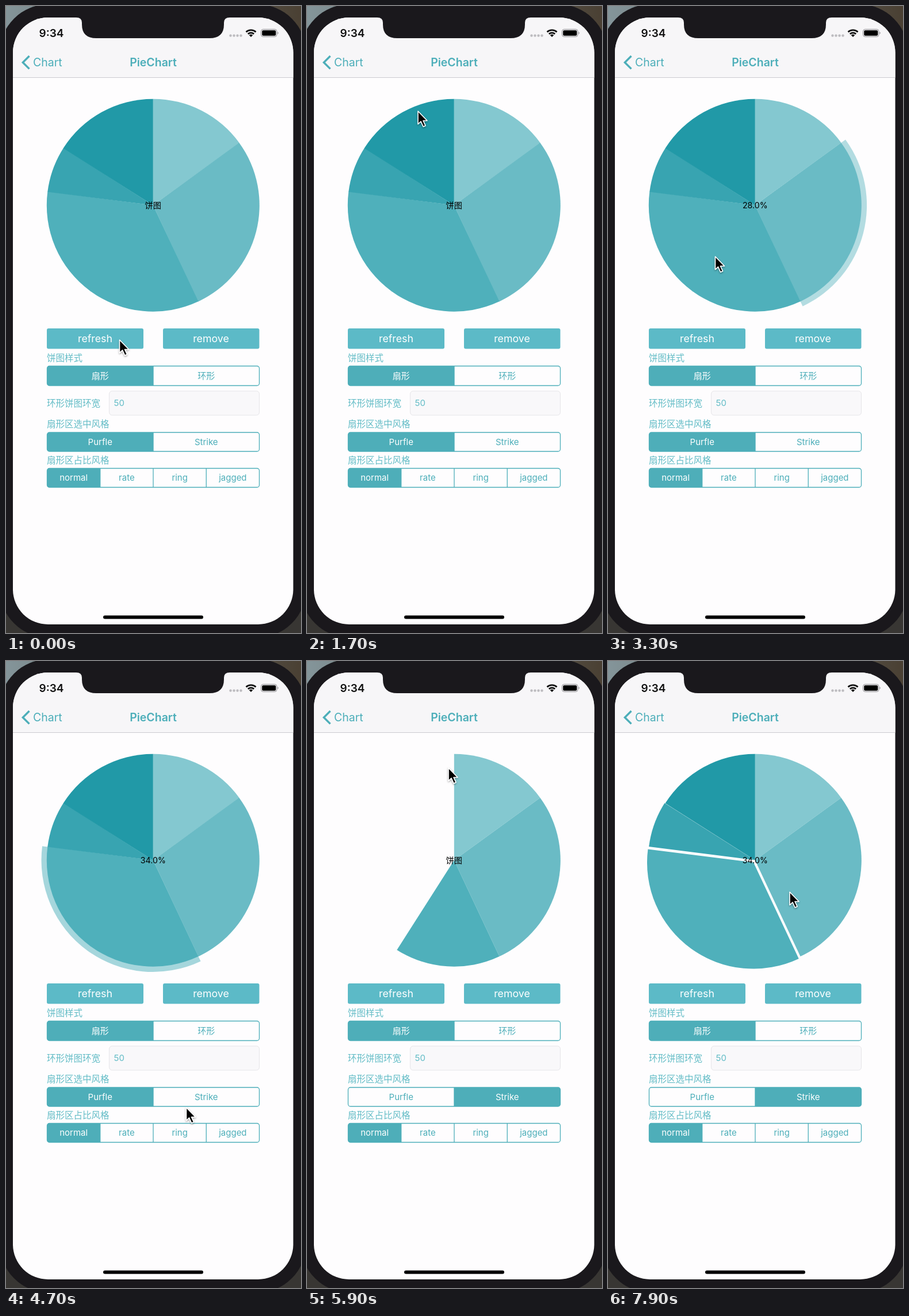
Write an HTML page that moves like this. It is 513 px wide and 1091 px high and loops after 8 s.

```html
<!DOCTYPE html>
<html lang="zh">
<head>
<meta charset="utf-8">
<title>PieChart</title>
<style>
  html, body { margin: 0; width: 100%; height: 100%; overflow: hidden; background: #1a181c; }
  svg { display: block; width: 100vw; height: 100vh; }
  text { font-family: Inter, "Noto Sans CJK SC", "Noto Sans CJK", sans-serif; fill: #4caeb9; }
  .mid { text-anchor: middle; }
  .label { font-size: 15.5px; fill: #62bcc6; }
  .btn { font-size: 17.8px; fill: #fff; }
  .seg { font-size: 15px; }
</style>
</head>
<body>
<svg viewBox="0 0 513 1091" preserveAspectRatio="none">
  <defs>
    <clipPath id="screen"><rect x="12" y="20" width="487.500" height="1056" rx="61"/></clipPath>
    <filter id="shade" x="-50%" y="-50%" width="200%" height="200%">
      <feDropShadow dx="0" dy="1.500" stdDeviation="1.400" flood-opacity=".4"/>
    </filter>
    <linearGradient id="desk" x2="1" y2="0">
      <stop offset="0" stop-color="#84959a"/><stop offset="1" stop-color="#4a4033"/>
    </linearGradient>
  </defs>

  <rect width="513" height="545" fill="url(#desk)"/>
  <rect y="545" width="513" height="546" fill="#383633"/>
  <rect x="-11" y="-3" width="533" height="1102" rx="85" fill="#1a181c"/>
  <g clip-path="url(#screen)">
    <rect y="20" width="513" height="1060" fill="#fefdfe"/>
    <rect y="20" width="513" height="104" fill="#f7f6f8"/>
    <rect y="124" width="513" height="1" fill="#cccbd0"/>
  </g>
  <path d="M122 19V20Q132 20 132 29V32Q132 56 157 56H354Q379 56 379 32V29Q379 20 389 20V19Z" fill="#1a181c"/>

  <text class="mid" x="79" y="54" font-size="19" font-weight="600" style="fill:#111">9:34</text>
  <g fill="#bdbcc0">
    <circle cx="390.500" cy="51.500" r="2.200"/><circle cx="396.500" cy="51.500" r="2.200"/>
    <circle cx="402.500" cy="51.500" r="2.200"/><circle cx="408.500" cy="51.500" r="2.200"/>
  </g>
  <g fill="none" stroke="#111" stroke-width="2.800">
    <path d="M417.500 45.200A12.500 12.500 0 0 1 434.500 45.200"/>
    <path d="M420.800 48.700A7.800 7.800 0 0 1 431.200 48.700"/>
  </g>
  <path d="M426 54L422.700 50.800A4.800 4.800 0 0 1 429.300 50.800Z" fill="#111"/>
  <rect x="443.500" y="40.500" width="27.500" height="13" rx="3.800" fill="none" stroke="#8d8c90"/>
  <rect x="445.200" y="42.200" width="24.100" height="9.600" rx="2.300" fill="#000"/>
  <path d="M472.500 44.800Q475 47 472.500 49.200Z" fill="#8d8c90"/>

  <path d="M40.500 87L29.300 98.200L40.500 109.400" fill="none" stroke="#4caeb9" stroke-width="3.400"/>
  <text x="47" y="105" font-size="19.500">Chart</text>
  <text class="mid" x="256" y="105" font-size="19.500" font-weight="600">PieChart</text>

  <g id="pie"></g>
  <text id="caption" class="mid" x="255.800" y="352" font-size="14.200" style="fill:#000"></text>

  <g fill="#5cbac7">
    <rect x="71" y="561" width="168" height="35.500" rx="3"/>
    <rect x="273" y="561" width="167.500" height="35.500" rx="3"/>
  </g>
  <text class="mid btn" x="155" y="585">refresh</text>
  <text class="mid btn" x="356.500" y="585">remove</text>

  <text class="label" x="71" y="617.500">饼图样式</text>
  <text class="label" x="71" y="696.500">环形饼图环宽</text>
  <rect x="179.500" y="670" width="261" height="42" rx="5" fill="#f9f8fa" stroke="#e6e5e9"/>
  <text class="label" x="187.500" y="696" style="font-size:15px">50</text>
  <text class="label" x="71" y="733">扇形区选中风格</text>
  <text class="label" x="71" y="795.500">扇形区占比风格</text>
  <g id="segments"></g>

  <rect x="169" y="1060.500" width="174" height="6" rx="3" fill="#000"/>
  <path id="cursor" d="M0 0V22.500L5 17.800L9.200 27L13 25.200L9 16.500H16Z"
        fill="#000" stroke="#fff" stroke-width="1.600" stroke-linejoin="round" filter="url(#shade)"/>
</svg>
<script>
const LOOP = 8000, STEP = 100;
const CX = 255.8, CY = 346.7, R = 185, RIM = 9.3;
const SWEEP = 830, SLIDE = 250, GAP = 6;
const rates = [0.15, 0.28, 0.34, 0.07, 0.16];
const colors = ['#84c8d0', '#6abbc5', '#4fb0bb', '#38a4b1', '#2199a7'];
const starts = rates.map((_, i) => rates.slice(0, i).reduce((a, b) => a + b, 0));

// Clicks: [time, action, slice]
const clicks = [
  [605, 'refresh'], [2000, 'pick', 4], [2400, 'pick', 0], [2900, 'pick', 1], [3500, 'pick', 2],
  [5410, 'strike'], [6500, 'pick', 4], [6900, 'pick', 3], [7700, 'pick', 2]
];
// Pointer stops: [time, x, y]
const stops = [
  [0, 197.5, 581], [500, 183, 580], [1000, 179, 579], [1250, 180, 540], [1700, 193, 183],
  [2000, 200, 195], [2400, 295, 220], [2900, 350, 350], [3300, 186.5, 436], [3800, 188, 442],
  [4500, 295, 755], [4700, 313.5, 777], [4900, 322, 800], [5200, 335, 768], [5450, 332, 760],
  [5900, 246, 186], [6500, 210, 215], [6900, 125, 288], [7250, 290, 488],
  [7700, 295, 455], [7900, 316, 402], [8000, 316, 402]
];

const $ = id => document.getElementById(id);
const clamp = v => Math.max(0, Math.min(1, v));
const point = (turn, r) => {
  const a = turn * 2 * Math.PI;
  return [CX + r * Math.sin(a), CY - r * Math.cos(a)];
};

function wedge(from, to, r) {
  const big = to - from > 0.5 ? 1 : 0;
  return `M${CX} ${CY}L${point(from, r)}A${r} ${r} 0 ${big} 1 ${point(to, r)}Z`;
}

function segment(y, h, names, on) {
  const x = 71.5, w = 369, cell = w / names.length;
  const clip = `inset(0 ${w - cell * (on + 1)}px 0 ${cell * on}px)`;
  const box = `x="${x}" y="${y}" width="${w}" height="${h}" rx="4"`;
  let out = `<rect ${box} fill="#4eaeb9" style="clip-path:${clip}"/>` +
    `<rect ${box} fill="none" stroke="#4caeb9" stroke-width="1.3"/>`;
  names.forEach((name, i) => {
    const left = x + cell * i;
    if (i) out += `<path d="M${left} ${y}v${h}" stroke="#4caeb9" stroke-width="1.3"/>`;
    out += `<text class="mid seg" x="${left + cell / 2}" y="${y + h / 2 + 5.4}"` +
      `${i === on ? ' style="fill:#fff"' : ''}>${name}</text>`;
  });
  return out;
}

function stateAt(t) {
  const s = { style: 0, sweep: 1, pick: -1, last: -1, slide: 1 };
  for (const [at, action, slice] of clicks) {
    if (t < at) break;
    if (action === 'pick') {
      s.last = s.pick;
      s.pick = slice;
      s.slide = clamp((t - at) / SLIDE);
    } else {
      s.pick = s.last = -1;
      s.sweep = clamp((t - at) / SWEEP);
      if (action === 'strike') s.style = 1;
    }
  }
  return s;
}

function drawPie(s) {
  let out = '';
  rates.forEach((rate, i) => {
    const from = starts[i], to = Math.min(from + rate, s.sweep);
    if (to <= from) return;
    if (s.style === 0 && i === s.pick)
      out += `<path d="${wedge(from, to, R + RIM)}" fill="#fefdfe"/>` +
        `<path d="${wedge(from, to, R + RIM)}" fill="${colors[i]}" opacity=".5"/>`;
    const out1 = s.style === 0 ? 0 : i === s.pick ? s.slide : i === s.last ? 1 - s.slide : 0;
    const [px, py] = point(from + rate / 2, GAP * out1);
    // A hair of overlap hides the seam under the next slice
    const end = i < 4 && to < s.sweep && s.style === 0 ? to + 0.0006 : to;
    out += `<path d="${wedge(from, Math.min(end, 0.99999), R)}" fill="${colors[i]}"` +
      ` transform="translate(${px - CX} ${py - CY})"/>`;
  });
  $('pie').innerHTML = out;
  $('caption').textContent = s.pick < 0 ? '饼图' : (rates[s.pick] * 100).toFixed(1) + '%';
}

function moveCursor(t) {
  const n = stops.findIndex(p => p[0] > t);
  const [t0, x0, y0] = stops[n - 1], [t1, x1, y1] = stops[n];
  const k = (t - t0) / (t1 - t0), e = k * k * (3 - 2 * k);
  $('cursor').setAttribute('transform', `translate(${x0 + (x1 - x0) * e} ${y0 + (y1 - y0) * e})`);
}

let shownStyle = -1, shownTime = -1;
function draw(t) {
  const s = stateAt(t);
  drawPie(s);
  moveCursor(t);
  if (s.style === shownStyle) return;
  shownStyle = s.style;
  $('segments').innerHTML =
    segment(626.5, 34, ['扇形', '环形'], 0) +
    segment(742, 33, ['Purfle', 'Strike'], s.style) +
    segment(804.5, 33, ['normal', 'rate', 'ring', 'jagged'], 0);
}

const begin = performance.now();
function tick() {
  const t = Math.floor((performance.now() - begin) % LOOP / STEP) * STEP;
  if (t !== shownTime) draw(shownTime = t);
  requestAnimationFrame(tick);
}
tick();
</script>
</body>
</html>
```
